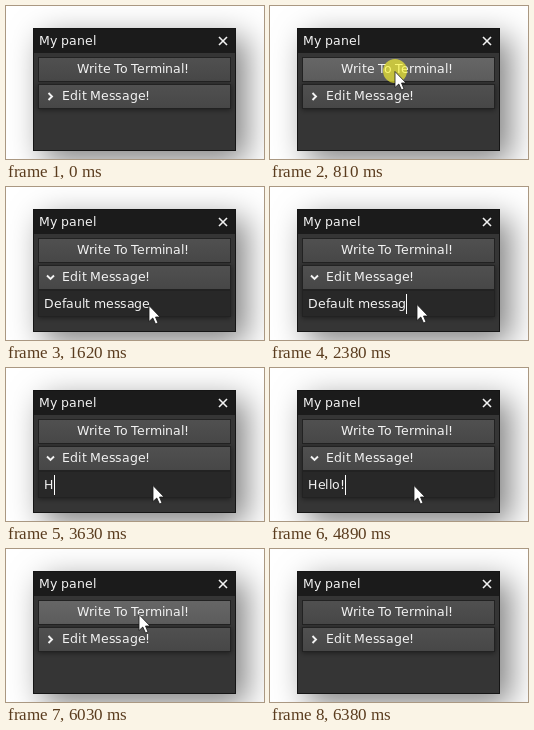
An HTML page with a canvas that plays this animation: 258 by 153 pixels, repeating every 6.99 s.

```html
<!DOCTYPE html>
<html lang="en">
<head>
<meta charset="utf-8">
<title>My panel</title>
<style>
  html, body { margin: 0; width: 100%; height: 100%; overflow: hidden; background: #fff; }
  canvas { display: block; }
</style>
</head>
<body>
<canvas id="stage" width="258" height="153"></canvas>
<script>
const ctx = document.getElementById('stage').getContext('2d');
const LOOP = 6990, STEP = 70;
const ENTER = 330, OPEN = 1150, FOCUS = 1760, CLOSE = 5230, LEAVE = 6380;
const BACKSPACE = 2380, ERASE = 2650, TYPE_TIMES = [3630, 3830, 3940, 4050, 4160, 4360];
const CLICKS = [810, OPEN, FOCUS, CLOSE, 5960];
const START = { x: 247, y: 96 };
const MOVES = [
  { from: ENTER, to: 610, x: 125, y: 65 },
  { from: 870, to: OPEN, x: 121, y: 88 },
  { from: 1350, to: 1630, x: 147, y: 123 },
  { from: 1690, to: FOCUS, x: 147, y: 117 },
  { from: 4820, to: 4890, x: 144, y: 117 },
  { from: 4890, to: 5100, x: 138, y: 88 },
  { from: 5430, to: 5850, x: 133, y: 65 },
  { from: 6170, to: LEAVE, x: 242, y: 99 }
];

const clamp = u => Math.min(1, Math.max(0, u));
const ease = u => u * u * (3 - 2 * u);

// The pointer eases from stop to stop, sampled once per STEP.
function pointerAt(t) {
  let { x, y } = START;
  for (const move of MOVES) {
    const elapsed = Math.floor((t - move.from) / STEP) * STEP;
    const u = ease(clamp(elapsed / (move.to - move.from)));
    x += (move.x - x) * u;
    y += (move.y - y) * u;
  }
  return { x: Math.round(x), y: Math.round(y) };
}

function fieldText(t) {
  if (t < BACKSPACE) return 'Default message';
  if (t >= TYPE_TIMES[0]) return 'Hello!'.slice(0, TYPE_TIMES.filter(time => time <= t).length);
  const erased = t < ERASE ? 0 : 2 * (Math.floor((t - ERASE) / STEP) + 1);
  return 'Default messag'.slice(0, Math.max(0, 14 - erased));
}

function rect(x, y, w, h, fill) {
  ctx.fillStyle = fill;
  ctx.fillRect(x, y, w, h);
}

function shadowRect(x, y, w, h, fill, color, blur, dx, dy) {
  ctx.save();
  ctx.shadowColor = color;
  ctx.shadowBlur = blur;
  ctx.shadowOffsetX = dx;
  ctx.shadowOffsetY = dy;
  rect(x, y, w, h, fill);
  ctx.restore();
}

// Glyphs sit on whole pixels; returns where the text ends.
function label(text, x, y) {
  const penAt = i => Math.round(x + 0.3 + ctx.measureText(text.slice(0, i)).width);
  ctx.fillStyle = '#f2f2f2';
  for (let i = 0; i < text.length; i++) {
    const kern = ctx.measureText(text.slice(0, i + 1)).width
      - ctx.measureText(text.slice(0, i)).width - ctx.measureText(text[i]).width;
    ctx.fillText(text[i], penAt(i) + Math.round(kern), y);
  }
  return penAt(text.length);
}

function line(points, width) {
  ctx.beginPath();
  points.forEach(([x, y]) => ctx.lineTo(x, y));
  ctx.strokeStyle = '#f2f2f2';
  ctx.lineWidth = width;
  ctx.stroke();
}

function button(y, hover) {
  const fill = ctx.createLinearGradient(0, y, 0, y + 23);
  fill.addColorStop(0, hover ? '#666' : '#505050');
  fill.addColorStop(1, hover ? '#5c5c5c' : '#474747');
  rect(32, y - 1, 193, 25, '#222');
  rect(33, y, 191, 23, fill);
}

function drawPanel() {
  rect(0, 0, 258, 153, '#fff');
  shadowRect(27, 22, 203, 123, '#151515', 'rgba(0,0,0,.5)', 30, 10, 10);
  rect(28, 23, 201, 121, '#353535');
  rect(28, 23, 201, 24, '#1b1b1b');
  label('My panel', 33, 39);
  line([[213, 31], [221, 39]], 1.6);
  line([[221, 31], [213, 39]], 1.6);
}

function drawField(t) {
  rect(32, 103, 193, 27, '#222');
  rect(33, 104, 191, 25, '#282828');
  const end = label(fieldText(t), 38, 121);
  if (t >= FOCUS) rect(end, 107, 1, 20, '#fff');
}

function drawPointer({ x, y }, pressed) {
  if (pressed) {
    ctx.fillStyle = 'rgba(255,250,45,.64)';
    ctx.beginPath();
    ctx.arc(x, y, 12, 0, 2 * Math.PI);
    ctx.fill();
  }
  ctx.save();
  ctx.translate(x, y);
  const arrow = new Path2D('M0 .5V16.5L3.8 13L6.5 19L9 18L6.5 12H11Z');
  ctx.fillStyle = '#fff';
  ctx.strokeStyle = '#1a1a1a';
  ctx.lineWidth = 0.8;
  ctx.fill(arrow);
  ctx.stroke(arrow);
  ctx.restore();
}

function draw(t) {
  const visible = t >= ENTER && t < LEAVE;
  const open = t >= OPEN && t < CLOSE;
  const pointer = pointerAt(t);
  const hovers = top => visible && pointer.x >= 33 && pointer.x < 224
    && pointer.y >= top && pointer.y < top + 23;

  ctx.font = '12.5px "DejaVu Sans", sans-serif';
  drawPanel();
  button(52, hovers(52));
  label('Write To Terminal!', 71, 67);
  shadowRect(32, 78, 193, open ? 52 : 25, '#222', 'rgba(0,0,0,.45)', 5, 0, 1);
  button(79, hovers(79));
  line(open ? [[41, 88.5], [44.5, 92], [48, 88.5]] : [[42.5, 87], [46, 90.5], [42.5, 94]], 1.9);
  label('Edit Message!', 56, 94);
  if (open) drawField(t);
  if (visible) drawPointer(pointer, CLICKS.some(time => t >= time && t < time + STEP));
}

function tick() {
  draw(performance.now() % LOOP);
  requestAnimationFrame(tick);
}
tick();
</script>
</body>
</html>
```
